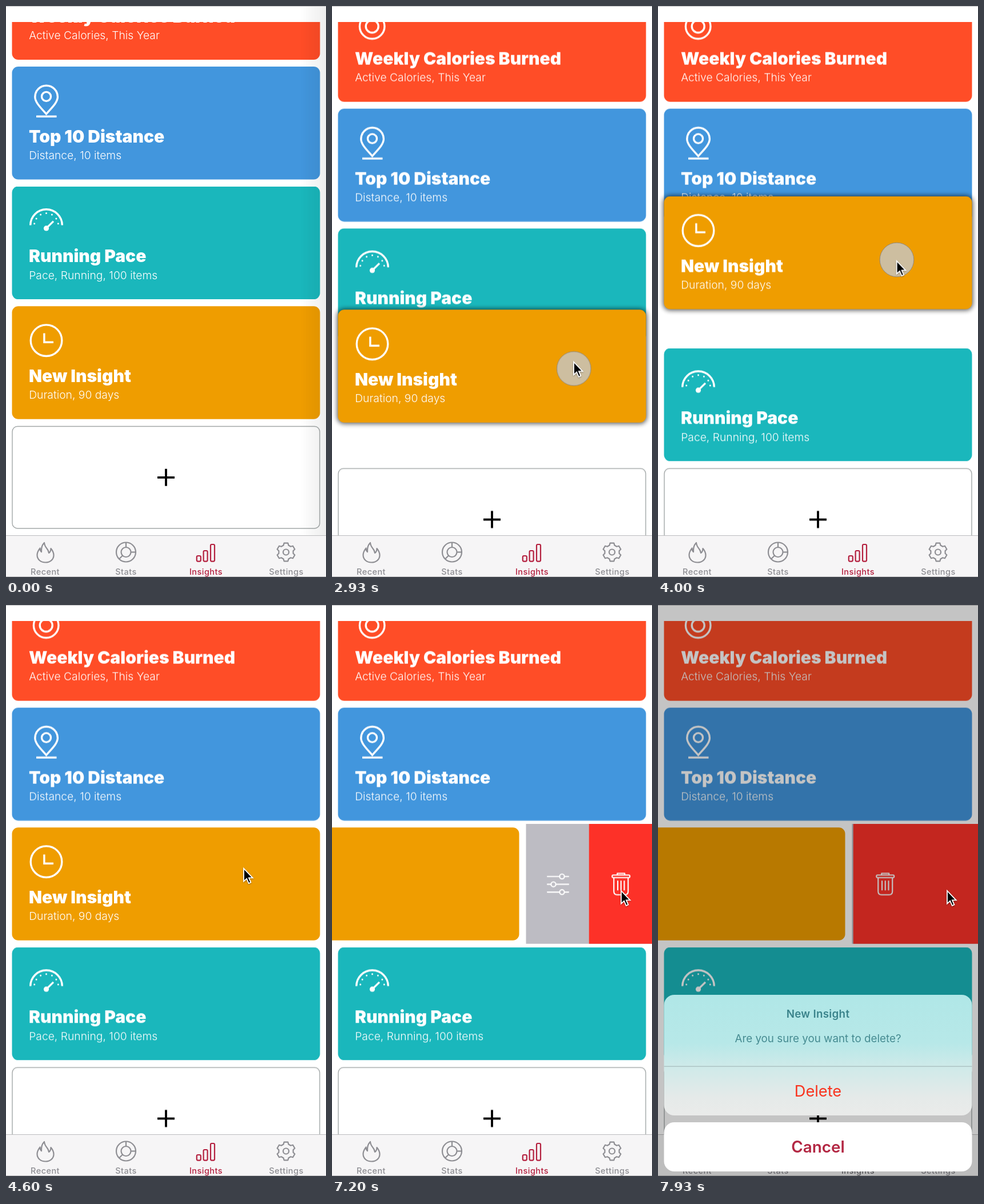
These frames come from a looping animation (560 px wide and 999 px high, 8 s). An HTML page:

```html
<!DOCTYPE html>
<html lang="en">
<head>
<meta charset="utf-8">
<title>Insights</title>
<style>
  html, body { margin: 0; width: 100%; height: 100%; overflow: hidden; background: #fff; }
  svg { display: block; width: 100vw; height: 100vh; }
  text { font-family: Inter, Roboto, sans-serif; font-optical-sizing: none; }
  .title { font-size: 30px; font-weight: 860; fill: #fff; }
  .detail { font-size: 19.3px; font-weight: 340; fill: #fff; }
  .icon { fill: none; stroke: #fff; stroke-width: 3.4; }
  .action { fill: none; stroke: #fff; stroke-width: 2.1; stroke-linecap: round; stroke-linejoin: round; }
  .tab { color: #8e8e93; }
  .tab.active { color: #b4203f; }
  .tab text { font-size: 14.5px; font-weight: 500; letter-spacing: .45px; fill: currentColor; text-anchor: middle; }
  .tab g { fill: none; stroke: currentColor; stroke-width: 2.2; stroke-linejoin: round; }
  #sheet text { text-anchor: middle; }
</style>
</head>
<body>
<svg id="stage" viewBox="0 0 560 999" preserveAspectRatio="none"></svg>
<script>
const LOOP = 8000;
const PITCH = 209.6, TOP = 106, SCROLL = 73.6;
const slot = i => TOP + PITCH * i;

const polar = (cx, cy, r, deg) => {
  const a = deg * Math.PI / 180;
  return [cx + r * Math.cos(a), cy - r * Math.sin(a)].map(v => v.toFixed(1));
};

const gaugeDots = [172, 146, 118, 90, 62, 34, 8].map(deg => {
  const [x, y] = polar(70.5, 68, 21, deg);
  return `<circle cx="${x}" cy="${y}" r="1.5" fill="#fff" stroke="none"/>`;
}).join('');

const gearPath = Array.from({ length: 6 }, (_, i) =>
  [[-12, 16.2], [12, 16.2], [20, 12.8], [40, 12.8]]
    .map(([turn, r]) => polar(490, 955.5, r, i * 60 + 30 + turn).join(' ')).join('L')
).join('L');

const icons = {
  rings: '<circle cx="70.2" cy="65.6" r="21.8"/><circle cx="70.2" cy="65.6" r="11"/>',
  pin: `<path d="M70.5 83C62 73 50.8 63 50.8 53a19.8 19.8 0 0 1 39.6 0C90.4 63 79 73 70.5 83Z"/>
        <circle cx="70.5" cy="52.4" r="8"/><path d="M53 87.3H88.5"/>`,
  gauge: `<path d="M42.7 68a27.8 27.8 0 0 1 55.6 0"/>${gaugeDots}
          <path d="M70.5 73.3L83 61"/><circle cx="70.5" cy="73.3" r="4.6" fill="#fff" stroke="none"/>`,
  clock: '<circle cx="70.5" cy="60" r="27.3"/><path d="M66.9 47.3V63H83"/>'
};

const card = (id, y, color, icon, title, detail, under = '') => `
  <g id="${id}" style="transform:translateY(${y}px)">
    ${under}
    <rect x="10.5" width="539" height="197.5" rx="11" fill="${color}"/>
    <g class="icon">${icons[icon]}</g>
    <text class="title" x="40" y="132.5">${title}</text>
    <text class="detail" x="40.2" y="162">${detail}</text>
  </g>`;

const liftShadow = '<rect id="lift" x="9" y="-1" width="542" height="200.5" rx="12" filter="url(#soft)" opacity="0"/>';

const bar = (x, y) => `<rect x="${x}" y="${y}" width="7" height="${971.6 - y}" rx="2"/>`;

const tab = (x, label, shapes, active = '') => `
  <g class="tab ${active}"><g>${shapes}</g><text x="${x}" y="994.5">${label}</text></g>`;

const spokes = [90, 0, 225].map(deg =>
  `<path d="M${polar(210, 955.5, 8.5, deg)}L${polar(210, 955.5, 17, deg)}"/>`).join('');

const sliders = [[475, 429], [488.7, 414], [502.4, 429]].map(([y, x]) =>
  `<path d="M403.5 ${y}H${x - 4.2}M${x + 4.2} ${y}H440.5"/><circle cx="${x}" cy="${y}" r="4.2"/>`).join('');

document.getElementById('stage').innerHTML = `
  <defs>
    <clipPath id="view"><rect y="28.2" width="560" height="971"/></clipPath>
    <filter id="soft" x="-5%" y="-12%" width="110%" height="124%"><feGaussianBlur stdDeviation="4.3"/></filter>
    <linearGradient id="edge"><stop stop-opacity="0"/><stop offset="1" stop-opacity=".07"/></linearGradient>
    <linearGradient id="frost" x2="0" y2="1">
      <stop stop-color="#b0e7e7"/><stop offset=".4" stop-color="#b7e8e8"/>
      <stop offset=".6" stop-color="#cfeae9"/><stop offset=".85" stop-color="#e5eae9"/>
      <stop offset="1" stop-color="#eaebea"/>
    </linearGradient>
  </defs>
  <rect width="560" height="999" fill="#fff"/>
  <g clip-path="url(#view)"><g id="list">
    ${card('calories', slot(-1), '#ff4d27', 'rings', 'Weekly Calories Burned', 'Active Calories, This Year')}
    ${card('distance', slot(0), '#4296dd', 'pin', 'Top 10 Distance', 'Distance, 10 items')}
    ${card('pace', slot(1), '#1ab7bc', 'gauge', 'Running Pace', 'Pace, Running, 100 items')}
    <rect x="11" y="735.5" width="538" height="178.5" rx="9" fill="#fff" stroke="#a3a8a8" stroke-width="1.4"/>
    <path d="M265 824.8H295M280 809.8V839.8" stroke="#000" stroke-width="3.8"/>
    <g transform="translate(0 ${slot(1) - 6})">
      <g id="edit"><rect x="561.5" width="300" height="${PITCH}" fill="#bdbcc3"/>
        <g class="action" transform="translate(195.5 -383.3)">${sliders}</g></g>
      <g id="remove"><rect x="560.75" width="300" height="${PITCH}" fill="#fd3128"/>
        <g class="action" transform="translate(97.75 -383.3)">
          <rect x="503.5" y="472.5" width="31" height="4.6" rx="2"/>
          <path d="M512.5 472V469.5H525.5V472M506.5 477.5V501Q506.5 507 512.5 507H525.5Q531.5 507 531.5 501V477.5M513.3 483V498.5M519 483V498.5M524.7 483V498.5"/>
        </g></g>
    </g>
    ${card('insight', slot(2), '#ef9d00', 'clock', 'New Insight', 'Duration, 90 days', liftShadow)}
  </g></g>
  <rect id="pageEdge" x="515" width="45" height="926" fill="url(#edge)"/>
  <rect y="926" width="560" height="73" fill="#f6f5f6"/>
  <path d="M0 926.5H560M0 .5H560M0 998.5H560" stroke="#bcbcbe"/>
  ${tab(68.5, 'Recent', `<path d="M67 939C67.5 948 74.500 949.500 75 957C77.500 955.500 78.500 952 78.500 949C82 953 83.500 957 83.500 961C83.500 968.500 77 973.500 69 973.500C61 973.500 54.500 968.500 54.500 960.500C54.500 955 57.500 951.500 59.500 948.500C59.500 951.500 60 953.500 62 955C61.500 948.500 63 943 67 939Z"/>`.replace(/00\b/g, ''))}
  ${tab(210, 'Stats', `<circle cx="210" cy="955.5" r="17"/><circle cx="210" cy="955.5" r="8.5"/>${spokes}`)}
  ${tab(350, 'Insights', bar(333.8, 962) + bar(345.6, 953) + bar(358, 942), 'active')}
  ${tab(490.5, 'Settings', `<path d="M${gearPath}Z"/><circle cx="490" cy="955.5" r="5"/>`)}
  <rect id="dim" width="560" height="999" opacity="0"/>
  <g id="sheet">
    <rect x="10.5" y="682" width="539" height="211" rx="18" fill="url(#frost)"/>
    <path d="M10.5 807.2H549.5" stroke="#9fb3b3"/>
    <text x="280" y="722.3" font-size="18.8" font-weight="600" letter-spacing=".3" fill="#3a838b">New Insight</text>
    <text x="280" y="764.5" font-size="18.8" fill="#468b91">Are you sure you want to delete?</text>
    <text x="280" y="860.3" font-size="27.2" fill="#f9341f">Delete</text>
    <rect x="10.5" y="905" width="539" height="86" rx="18" fill="#fff"/>
    <text x="280" y="957.8" font-size="27.8" font-weight="600" fill="#b32743">Cancel</text>
  </g>
  <g id="touch"><circle id="press" r="29.8" fill="rgba(197,197,197,.81)" stroke="rgba(125,128,138,.8)" opacity="0"/></g>
  <g id="cursor">
    <path d="M0 0V22.500L5.200 17.800L8.800 26L12.400 24.400L8.900 16.400H15.700Z" stroke="#fff" stroke-width="1.8" style="filter:drop-shadow(0 1px 1px rgba(0,0,0,.35))"/>
  </g>`;

// Steps are [time in ms, value, easing towards the next step].
function play(selector, property, steps, format = v => v) {
  const all = [[0, steps[0][1]], ...steps, [LOOP, steps[steps.length - 1][1]]];
  document.querySelector(selector).animate(
    all.map(([time, value, easing = 'linear']) =>
      ({ offset: time / LOOP, [property]: format(value), easing })),
    { duration: LOOP, iterations: Infinity });
}
const moveX = x => `translateX(${x}px)`;
const moveY = y => `translateY(${y}px)`;
const movePoint = ([x, y]) => `translate(${x}px, ${y}px)`;

const SMOOTH = 'ease-in-out';
const PICK_UP = 'cubic-bezier(.3,0,1,1)';
const DRAG = 'cubic-bezier(.33,.36,.67,.8)';
const SWIPE = 'cubic-bezier(.35,.1,.7,.78)';
const SPRING = 'cubic-bezier(.2,.8,.2,1)';

const path = [
  [1050, [575, 655], SMOOTH], [1700, [425, 634]],
  [1900, [425, 634], SMOOTH], [2200, [425, 708]],
  [2480, [425, 708], PICK_UP], [2930, [423, 623], DRAG],
  [3600, [419, 454], 'ease-out'], [3800, [418, 443]],
  [3900, [418, 443], SMOOTH], [4250, [416, 461]],
  [4750, [416, 461], SMOOTH], [5200, [428, 497]],
  [5430, [428, 497], SWIPE], [6000, [222, 491], 'ease-out'], [6120, [201, 490]],
  [6300, [201, 490], SMOOTH], [6900, [506, 500]]
];
const LAG = 45;
play('#cursor', 'transform', path, movePoint);
play('#touch', 'transform', path.map(([t, ...rest]) => [t + LAG, ...rest]), movePoint);
play('#press', 'opacity', [
  [1830, 0], [1890, 1], [4340, 1], [4420, 0],
  [5370, 0], [5430, 1], [6100, 1], [6180, 0],
  [7260, 0], [7310, 1], [7400, 1], [7470, 0]
]);

play('#pageEdge', 'opacity', [[900, 1], [1100, 0]]);
play('#list', 'transform', [[1920, 0, SMOOTH], [2240, SCROLL]], moveY);

play('#lift', 'opacity', [[2440, 0], [2580, .66], [4350, .66], [4570, 0]]);
play('#pace', 'transform', [[3517, slot(1), SMOOTH], [3817, slot(2)]], moveY);

const SHIFT = 222;
const swipe = [[5470, 0, SWIPE], [6000, 196, 'ease-out'], [6130, SHIFT]];

// The dragged card moves vertically first, then sideways.
play('#insight', 'transform', [
  [2520, [0, slot(2)], PICK_UP], [2930, [0, 531.5 - SCROLL], DRAG],
  [3600, [0, 352 - SCROLL], 'ease-out'], [3850, [0, 332 - SCROLL]],
  [3930, [0, 332 - SCROLL], SMOOTH], [4300, [0, 343 - SCROLL]],
  [4350, [0, 343 - SCROLL], SMOOTH], [4570, [0, slot(1)]],
  ...swipe.map(([t, x, easing]) => [t, [-x, slot(1)], easing])
], movePoint);
play('#edit', 'transform', swipe.map(([t, x, easing]) => [t, -x, easing]), moveX);
play('#remove', 'transform', [
  ...swipe.map(([t, x, easing]) => [t, -x / 2, easing]),
  [7450, -SHIFT / 2, SPRING], [7930, 3 - SHIFT], [7995, 1 - SHIFT]
], moveX);

play('#dim', 'opacity', [[7450, 0, 'ease-out'], [7820, .232]]);
play('.tab.active', 'color', [[7450, '#b4203f'], [7820, '#707074']]);
play('#sheet', 'transform', [[7450, 325, SPRING], [7910, 0]], moveY);
</script>
</body>
</html>
```
